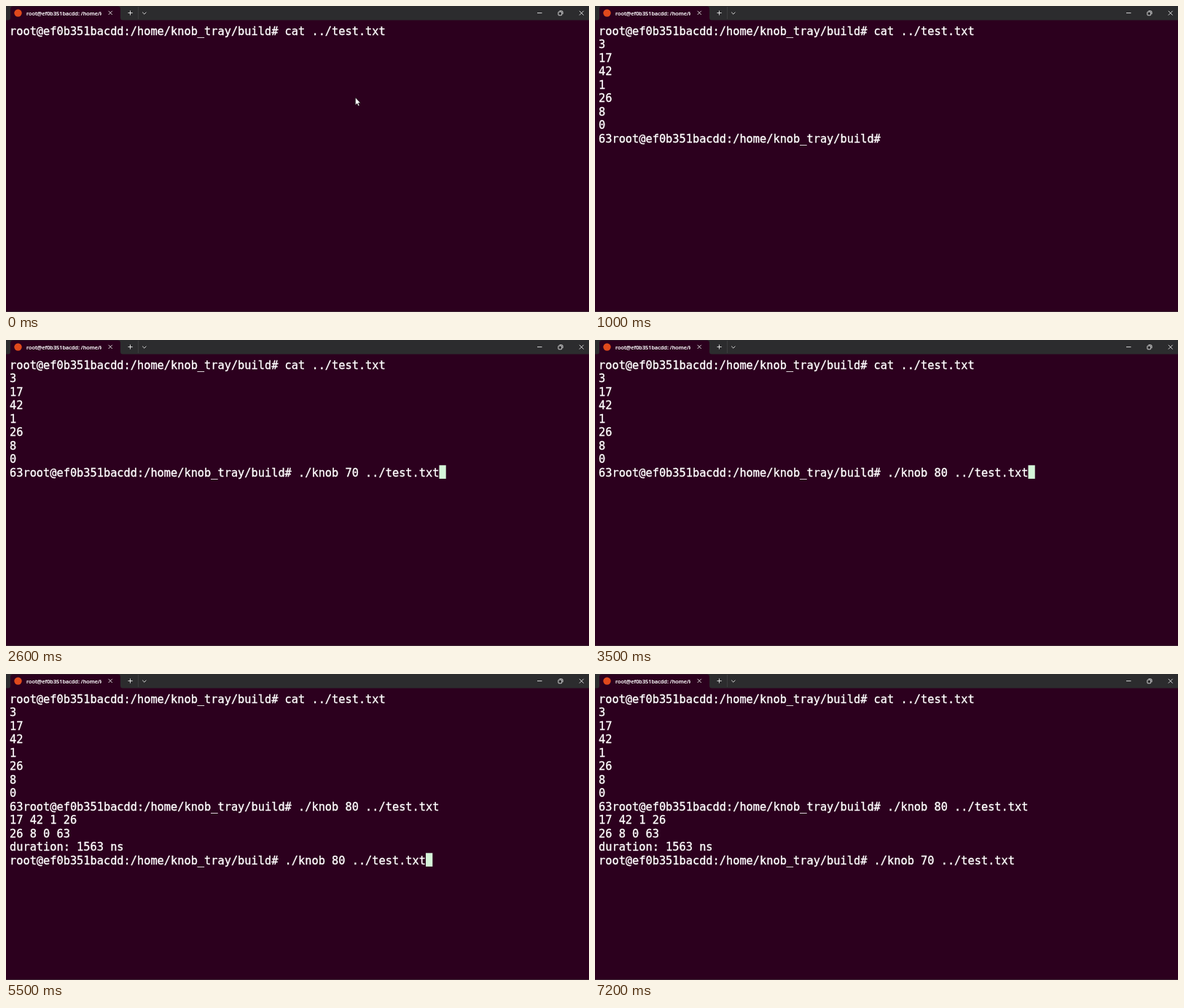
An HTML page that plays this animation: 800x421 px, repeating every 8000 ms.

```html
<!DOCTYPE html>
<html lang="en">
<head>
<meta charset="utf-8">
<title>Terminal session</title>
<style>
  html, body { margin: 0; width: 100%; height: 100%; overflow: hidden; background: #2c001e; }
  svg { display: block; width: 100vw; height: 100vh; }
  .term text { font: 15.3px "DejaVu Sans Mono", monospace; fill: #fff; stroke: #fff; stroke-width: 0.35; white-space: pre; font-variant-ligatures: none; }
  .title { font: 600 7.3px "Open Sans", "Noto Sans", sans-serif; fill: #fff; stroke: #fff; stroke-width: 0.15; white-space: pre; }
  .icon { fill: none; stroke: #f2f2f2; stroke-width: 0.85; }
</style>
</head>
<body>
<svg viewBox="0 0 800 421">
  <defs>
    <clipPath id="titleClip"><rect x="27" y="0" width="104" height="19"/></clipPath>
  </defs>
  <rect width="800" height="421" fill="#2c001e"/>
  <rect width="800" height="19.5" fill="#2c2c2e"/>
  <path d="M2 20Q6 20 6 16V4Q6 0.5 9.5 0.5H153.5Q157 0.5 157 4V16Q157 20 161 20Z" fill="#2c001e"/>
  <circle cx="16.5" cy="9.6" r="5.2" fill="#e0491c"/>
  <text id="title" class="title" x="28" y="12.6" clip-path="url(#titleClip)"></text>
  <path d="M181.5 1V18" stroke="#3c3c3f"/>
  <g class="icon">
    <path d="M140.6 6.8L145.8 12M145.8 6.8L140.6 12"/>
    <path d="M167.5 9.5H173.7M170.5 6.4V12.6"/>
    <path d="M187.2 8.6L189.8 11.2L192.4 8.6"/>
    <path d="M729 9.6H735.5"/>
    <rect x="757.9" y="8" width="4.8" height="4.8" rx="0.8"/>
    <path d="M759.5 6.8H762.6Q764 6.8 764 8.2V11.2"/>
    <path d="M786.8 6.8L792.6 12.6M792.6 6.8L786.8 12.6"/>
  </g>
  <g class="term">
    <rect id="cursor" width="9.3" height="18.6" fill="#d5f5d9"/>
    <g id="lines"></g>
  </g>
  <path id="pointer" d="M479.5 126V136.2L481.8 134.1L483.4 137.6L485 136.9L483.4 133.5H486.4Z" fill="#fff" stroke="#111" stroke-width="0.5"/>
  <path d="M0 420.5H800" stroke="#47363f" stroke-opacity="0.7"/>
</svg>
<script>
const LOOP = 8000, LEFT = 5, TOP = 24.3, CELL = 9.21, ROW = 18.5, BASELINE = 15.2;
const byId = id => document.getElementById(id);

const host = "root@ef0b351bacdd:";
const prompt = host + "/home/knob_tray/build# ";
const cat = "cat ../test.txt ";
const run = n => `./knob ${n} ../test.txt`;

const first = [prompt + cat];
const second = [...first, "3", "17", "42", "1", "26", "8", "0"];
const third = [...second, "63" + prompt + run(80), "17 42 1 26", "26 8 0 63", "duration: 1563 ns"];
const after63 = cmd => [...second, "63" + prompt + cmd];
const afterRun = cmd => [...third, prompt + cmd];

// Each step: start time, screen lines, cursor visible
const steps = [
  [0, first, false],
  [100, after63(""), true],
  [400, after63(""), false],
  [1600, after63(cat), true],
  [2000, after63("clear"), true],
  [2600, after63(run(70)), true],
  [3000, after63(run(75)), true],
  [3500, after63(run(80)), true],
  [4200, afterRun(""), true],
  [5500, afterRun(run(80)), true],
  [5900, afterRun(cat), true],
  [6400, afterRun("clear"), true],
  [6900, afterRun(run(70)), true],
  [7200, afterRun(run(70)), false]
];

byId("title").textContent = host + " /home/knob_tray/build";

const rows = Array.from({ length: third.length + 1 }, (_, i) => {
  const row = document.createElementNS("http://www.w3.org/2000/svg", "text");
  row.setAttribute("x", LEFT);
  row.setAttribute("y", TOP + BASELINE + i * ROW);
  byId("lines").append(row);
  return row;
});

let shown;

function render(time) {
  const step = steps.findLast(([start]) => start <= time);
  if (step === shown) return;
  shown = step;
  const [start, lines, cursorOn] = step;
  rows.forEach((row, i) => { row.textContent = lines[i] ?? ""; });
  const last = lines.length - 1;
  const cursor = byId("cursor");
  cursor.setAttribute("x", LEFT + lines[last].length * CELL);
  cursor.setAttribute("y", TOP + last * ROW);
  cursor.style.display = cursorOn ? "" : "none";
  byId("pointer").style.display = start === 0 ? "" : "none";
}

const origin = performance.now();
function tick() {
  render((performance.now() - origin) % LOOP);
  requestAnimationFrame(tick);
}
tick();
</script>
</body>
</html>
```
